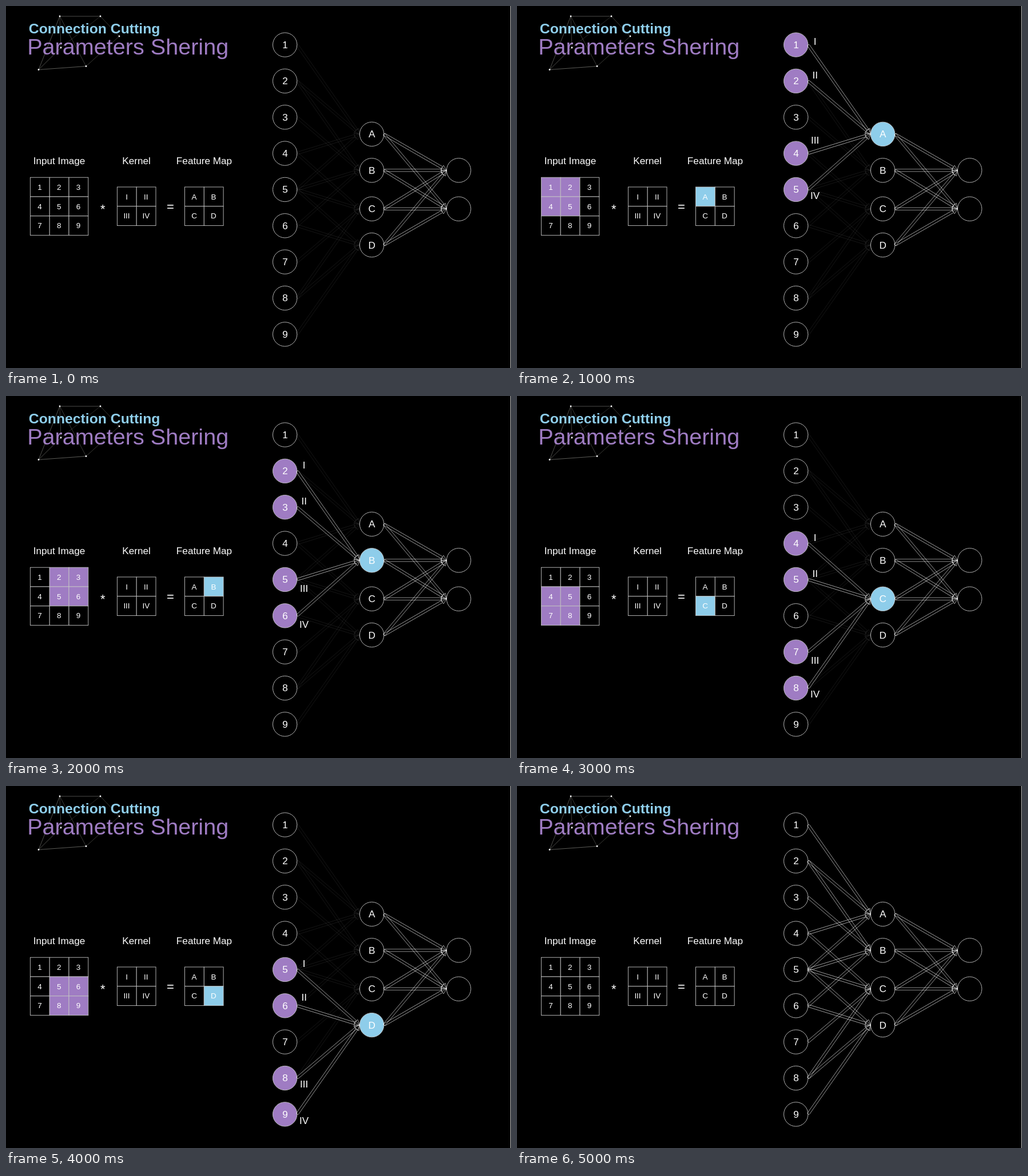
Recreate the animation shown at these times as an HTML page. Size 883 by 634 pixels, loop 6000 ms.

```html
<!DOCTYPE html>
<html lang="en">
<head>
<meta charset="utf-8">
<title>Connection Cutting</title>
<style>
  html, body { margin: 0; width: 100%; height: 100%; overflow: hidden; background: #000; }
  svg { display: block; width: 100%; height: 100%; }
  text { font-family: "Liberation Sans", Arial, sans-serif; fill: #fff; }
  .cell, .node { stroke: #c4c4c4; stroke-width: .9; }
  .arrow { fill: none; stroke: #fff; stroke-width: .7; stroke-opacity: .78; }
  .dim { stroke-opacity: .11; }
</style>
</head>
<body>
<svg id="stage" viewBox="0 0 883 634"></svg>
<script>
const PURPLE = '#9f7cc3', BLUE = '#8ecdea', BLACK = '#000';
const BODY = 17.17, SMALL = 13.49;
const ROMAN = ['I', 'II', 'III', 'IV'];
const stage = document.getElementById('stage');

function add(tag, attrs, parent = stage) {
  const el = document.createElementNS('http://www.w3.org/2000/svg', tag);
  for (const key in attrs) el.setAttribute(key, attrs[key]);
  return parent.appendChild(el);
}

function label(str, x, y, size, extra) {
  const el = add('text', { x, y, 'font-size': size, 'text-anchor': 'middle', ...extra });
  el.textContent = str;
  return el;
}

// Text centred vertically on y by its cap height
const centred = (str, x, y, size) => label(str, x, y + size * 0.344, size);

function grid(names, n, x, y) {
  const side = 33.8;
  return names.map((name, i) => {
    const cx = x + (i % n) * side, cy = y + Math.floor(i / n) * side;
    const rect = add('rect', { x: cx, y: cy, width: side, height: side, class: 'cell', fill: BLACK });
    centred(name, cx + side / 2 - 0.3, cy + side / 2, SMALL);
    return rect;
  });
}

function node(name, x, y) {
  const circle = add('circle', { cx: x, cy: y, r: 21.2, class: 'node', fill: BLACK });
  centred(name, x + 0.2, y, BODY);
  return circle;
}

// Hollow arrow: round-capped shaft and a triangular head
function arrow(x1, y1, x2, y2) {
  const len = Math.hypot(x2 - x1, y2 - y1);
  const angle = Math.atan2(y2 - y1, x2 - x1) * 180 / Math.PI;
  const base = len - 9;
  return add('path', {
    class: 'arrow',
    transform: `translate(${x1} ${y1}) rotate(${angle})`,
    d: `M${base} -2.1H1.5Q0 -2.1 0 0T1.5 2.1H${base}M${base} -4.8L${len} 0L${base} 4.8Z`
  });
}

function constellation() {
  const dots = [[94, 18], [165, 18], [198, 53], [140, 105.5], [57, 111.5], [96, 73]];
  const links = [[0, 1, .42], [1, 2, .3], [2, 3, .3], [3, 4, .5], [4, 0, .42],
                 [0, 5, .32], [0, 3, .32], [4, 5, .42], [5, 1, .22]];
  for (const [a, b, o] of links)
    add('path', { d: `M${dots[a]}L${dots[b]}`, stroke: '#b8b8b0', 'stroke-opacity': o, 'stroke-width': 1 });
  for (const [cx, cy] of dots) add('circle', { cx, cy, r: 1.4, fill: '#fff' });
}

add('rect', { width: 883, height: 634, fill: BLACK });
add('rect', { x: 882, width: 1, height: 634, fill: '#ccc' });

label('Connection Cutting', 39.8, 47.5, 24.75,
  { 'text-anchor': 'start', 'font-weight': 700, style: `fill:${BLUE}` });
label('Parameters Shering', 37.2, 85, 39.6, { 'text-anchor': 'start', style: `fill:${PURPLE}` });
constellation();

label('Input Image', 93, 276.6, BODY);
label('Kernel', 228, 276.6, BODY);
label('Feature Map', 346.5, 276.6, BODY);
label('*', 169.2, 362.8, 22.07);
label('=', 287.4, 359, 22.07);

const digits = [...'123456789'], letters = [...'ABCD'];
const pixels = grid(digits, 3, 42.4, 300.2);
grid(ROMAN, 2, 194.4, 317);
const features = grid(letters, 2, 312.5, 317);

const inX = 487.7, midX = 639.6, outX = 791.6, R = 21.2;
const inY = digits.map((_, i) => 68 + i * 63.36);
const midY = [224.4, 287.8, 355.3, 418.6];
const outY = [287.8, 355.3];

const inputs = digits.map((d, i) => node(d, inX, inY[i]));
const hidden = letters.map((c, i) => node(c, midX, midY[i]));
outY.forEach(y => node('', outX, y));

// Inputs covered by the 2x2 kernel at each of its four positions
const windows = letters.map((_, k) => [0, 1, 3, 4].map(o => o + (k >> 1) * 3 + (k & 1)));
const links = windows.map((win, k) => win.map(i => arrow(inX + R, inY[i], midX - R, midY[k])));
midY.forEach(y => outY.forEach(o => arrow(midX + R, y, outX - R, o)));

const weightY = [[62, 121, 235, 332], [121, 184.5, 337, 400], [248, 311, 463.5, 522.5], [311, 370, 522.5, 586]];
const weights = ROMAN.map(r => centred(r, 521.2, 0, BODY));

function draw(time) {
  const step = Math.floor(time / 1000) % 6;
  const active = step - 1;
  const win = windows[active] || [];
  digits.forEach((_, i) => {
    const fill = win.includes(i) ? PURPLE : BLACK;
    pixels[i].setAttribute('fill', fill);
    inputs[i].setAttribute('fill', fill);
  });
  letters.forEach((_, k) => {
    const fill = k === active ? BLUE : BLACK;
    features[k].setAttribute('fill', fill);
    hidden[k].setAttribute('fill', fill);
    const lit = k === active || step === 5;
    links[k].forEach(a => a.classList.toggle('dim', !lit));
  });
  weights.forEach((w, j) => {
    w.setAttribute('visibility', win.length ? 'visible' : 'hidden');
    if (win.length) w.setAttribute('y', weightY[active][j] + BODY * 0.344);
  });
}

function tick() {
  draw(performance.now());
  requestAnimationFrame(tick);
}
tick();
</script>
</body>
</html>
```
